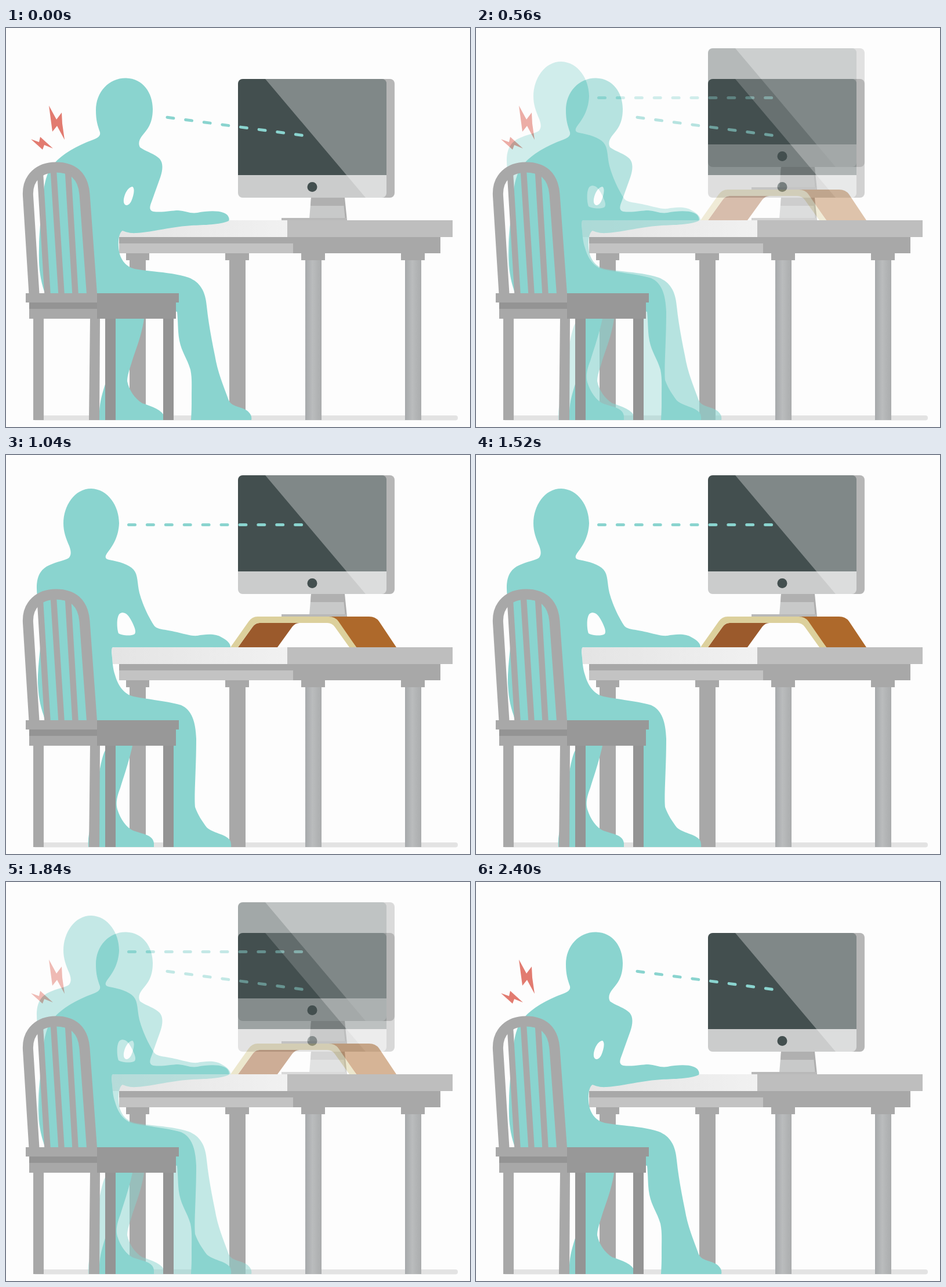
Write an HTML page that moves like this. It is 800x689 px and loops after 2.44 s.

```html
<!DOCTYPE html>
<html lang="en">
<head>
<meta charset="utf-8">
<title>Desk posture</title>
<style>
  html, body { margin: 0; height: 100%; overflow: hidden; background: #fdfdfd; }
  svg { display: block; width: 100vw; height: 100vh; }
  .grey { fill: #a8a8a8; }
  .dark { fill: #989898; }
  .body { fill: #8ad4cf; fill-rule: evenodd; }
  .gaze { stroke: #8ad4cf; stroke-width: 5; stroke-linecap: round; stroke-dasharray: 11 20.9; }
  .frame { fill: none; stroke: #a8a8a8; }
</style>
</head>
<body>
<svg viewBox="0 0 800 689">
  <defs>
    <linearGradient id="steel">
      <stop offset="0" stop-color="#a6a9ab"/>
      <stop offset=".45" stop-color="#babcbd"/>
      <stop offset="1" stop-color="#aaacad"/>
    </linearGradient>
    <linearGradient id="top">
      <stop offset="0" stop-color="#e4e4e4"/>
      <stop offset="1" stop-color="#f1f1f1"/>
    </linearGradient>
    <clipPath id="panel"><rect x="400" y="88" width="256" height="205" rx="8"/></clipPath>

    <g id="room">
      <rect width="800" height="689" fill="#fdfdfd"/>
      <rect x="47" y="669" width="732" height="8.5" rx="4" fill="#e3e3e3"/>
      <path class="grey" d="M213 389h28v288h-28zM385 389h28v288h-28z"/>
      <path fill="url(#steel)" d="M516 400h28v277h-28z"/>
      <path fill="url(#steel)" d="M688 400h28v277h-28z"/>
      <path class="grey" d="M207 389h40v12h-40zM378 389h41v12h-41zM509 389h41v12h-41zM681 389h41v12h-41z"/>
      <path fill="url(#top)" d="M485 332H186Q182 332 182 336L184 361H485z"/>
      <path fill="#bebebe" d="M485 332h285v29H485z"/>
      <path fill="#c3c3c3" d="M195 372h300v17H195z"/>
      <path class="grey" d="M195 361h554v28H495v-17H195z"/>
    </g>

    <g id="monitor">
      <path fill="#c8c9c9" d="M526 293h56l5 36h-64z"/>
      <path fill="#b0b0b0" d="M526 293h56l2 14h-59z"/>
      <path fill="#aeaeae" d="M581 293h3l4 39h-3z"/>
      <path fill="#b9b9b9" d="M475 328h112v4H475z"/>
      <rect x="420" y="88" width="250" height="205" rx="8" fill="#b6b6b6"/>
      <g clip-path="url(#panel)">
        <path fill="#434f4f" d="M400 88h256v166H400z"/>
        <path fill="#cbcccc" d="M400 254h256v39H400z"/>
        <path fill="#fff" opacity=".32" d="M447 88h209v205H620z"/>
      </g>
      <circle cx="528" cy="274.5" r="8.5" fill="#434f4f"/>
    </g>
  </defs>

  <g id="slouched">
    <use href="#room"/>
    <use href="#monitor"/>
    <path class="body" d="M207 86.5C236 87 253 112 253 140C253 165 244 175 234 187C229 194 228 200 231 206
      C240 213 256 217 264 225C272 233 270 246 266 258L251 300C247 310 247 315 254 317
      C270 319 285 315 297 315C310 316 318 321 330 319C345 316 365 315 375 319C384 322 386 330 384 333
      C370 340 340 340 320 341C285 343 250 353 225 354C212 355 204 351 201 350
      C196 352 193 364 194 378C195 397 205 412 222 416C250 421 290 422 315 431C335 439 344 455 346 480
      C349 510 355 540 360 565C365 595 374 615 384 643C390 655 405 653 416 661C423 667 424 672 423 677
      H319C320 660 320 655 320 640C320 615 321 605 318 590C312 570 303 560 299 540C296 525 297 510 295 490
      L240 480L238 502C235 525 226 550 219 570C213 590 209 600 209 610C212 625 222 640 235 648
      C250 653 265 658 271 667L272 677H161C160 655 163 640 171 615C178 595 185 560 188 480
      H75L66 455C58 430 56 410 57 380C57 350 62 310 65 280C68 260 72 245 85 232
      C100 215 130 200 150 193C160 189 163 186 162 180C158 168 155 160 155 142C155 110 178 86 207 86.5Z
      M218 274C210 274 202 290 203 301C205 309 212 307 216 299C220 290 223 277 218 274Z"/>
    <path fill="#e27b70" d="M74 134L87 158L96 146L97 165L101 193L88 169L80 179zM43 192L57 197L59 188L81 208L66 202L63 210z"/>
    <path class="gaze" d="M278 154.2L511 185.4"/>
  </g>

  <g id="upright">
    <use href="#room"/>
    <use href="#monitor" y="-53"/>
    <path fill="#ae692b" d="M556 279H626Q637 279 643 287L673 332H604L571 287z"/>
    <path fill="#9b5a2c" d="M400 332L425 297Q430 290 437 290H506Q499 290 494 296L468 332z"/>
    <path fill="#dcd09c" d="M387 332L418 288Q424 279 434 279H556Q567 279 573 287L604 332H592
      L567 297Q562 290 554 290H437Q430 290 425 297L400 332z"/>
    <path class="body" d="M147 58C176 59 195 88 195 118C194 142 184 157 174 170C170 176 171 180 178 181
      C195 184 212 189 220 198C228 207 226 222 230 238C236 260 246 280 255 294C260 302 275 301 290 305
      C305 308 318 313 330 312C345 309 362 308 372 315C382 320 387 326 387 332
      H184C181 334 182 340 183 350C184 360 184 368 188 380C193 398 203 413 220 417
      C250 423 280 425 302 432C320 440 327 460 328 490C328 540 324 590 326 608C331 622 338 632 346 643
      C356 653 378 654 386 665C389 670 388 677 388 677H280V480H222L218 502C212 530 203 555 197 575
      C191 590 189 602 192 612C198 630 207 642 218 648C235 655 253 655 255 670V677
      H142C141 663 143 650 148 635C155 600 160 530 171 510L185 480H72L65 450C58 430 56 415 55 395
      C54 370 60 330 62 300C62 270 53 255 53 230C53 208 60 195 80 188C92 183 105 181 109 177
      C113 172 112 165 109 157C103 143 99 132 99 118C99 88 118 58 147 58Z
      M196 274C190 280 191 300 194 308C200 312 216 313 222 309C225 304 221 295 215 284C209 272 201 270 196 274Z"/>
    <path class="gaze" d="M211.5 120.5H510"/>
  </g>

  <g id="chair">
    <path class="frame" stroke-width="18" d="M48.5 459L38 290C36 258 58 240.5 86 240.5C115 240.5 133 255 135.5 287L148 459"/>
    <path class="frame" stroke-width="10.5" d="M59 253L71.5 459M82 248L95.5 459M107 248L119.5 459"/>
    <path class="grey" d="M47 502h18v175H47zM145 502h17l-1 175h-18z"/>
    <path fill="#949494" d="M171 502h18v175h-18zM271 502h18v175h-18z"/>
    <path class="grey" d="M34 458h123v16H34zM40 485h117v17H40z"/>
    <path fill="#949494" d="M40 474h117v11H40z"/>
    <path class="dark" d="M157 458h141v16h-5v28H157z"/>
  </g>
</svg>
<script>
  const LOOP = 2440, STEP = 40;
  const upright = document.getElementById('upright');
  const ramp = (time, from, to) => Math.min(1, Math.max(0, (time - from) / (to - from)));

  function draw() {
    const time = Math.floor(performance.now() % LOOP / STEP) * STEP;
    upright.setAttribute('opacity', ramp(time, 430, 768) - ramp(time, 1635, 2035));
    requestAnimationFrame(draw);
  }
  draw();
</script>
</body>
</html>
```
